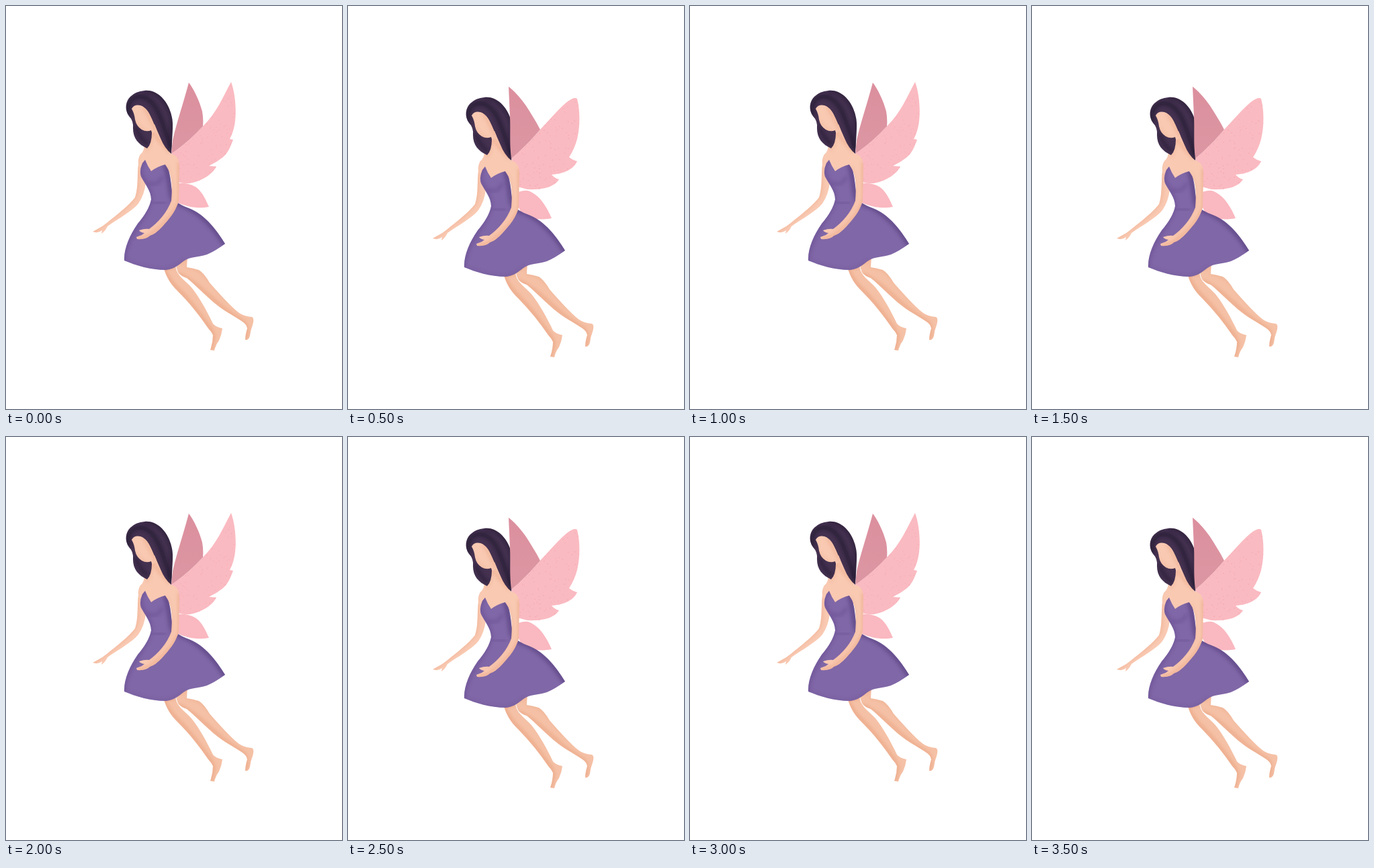
An HTML page for the animation above (4 s loop, 500 by 600 pixels).

```html
<!DOCTYPE html>
<html lang="en">
<head>
<meta charset="utf-8">
<title>Fairy</title>
<style>
html, body { margin: 0; width: 100%; height: 100%; overflow: hidden; background: #fff; }
svg { display: block; width: 500px; height: 600px; }
</style>
</head>
<body>
<svg id="stage" viewBox="0 0 500 600" xmlns="http://www.w3.org/2000/svg">
  <defs>
    <filter id="soft" x="-30%" y="-30%" width="160%" height="160%"><feGaussianBlur stdDeviation="2.6"/></filter>
    <linearGradient id="rearTone" x1="0" y1="0" x2="0" y2="1">
      <stop offset="0" stop-color="#dc8f9e"/><stop offset="1" stop-color="#dc97a3"/>
    </linearGradient>
  </defs>
  <g id="wings"></g>
  <g id="body"></g>
  <path id="rear" fill="url(#rearTone)"/>
</svg>
<script>
const NS = 'http://www.w3.org/2000/svg';
const get = id => document.getElementById(id);
const wings = get('wings'), body = get('body'), rear = get('rear');
const defs = document.querySelector('defs');

function add(parent, tag, attrs) {
  const el = document.createElementNS(NS, tag);
  for (const k in attrs) el.setAttribute(k, attrs[k]);
  parent.appendChild(el);
  return el;
}

// A filled shape with soft strokes clipped to its outline: [path, colour, width, opacity]
function shape(parent, id, d, fill, shades = []) {
  add(add(defs, 'clipPath', { id }), 'path', { d });
  add(parent, 'path', { d, fill });
  const g = add(parent, 'g', { 'clip-path': `url(#${id})` });
  for (const [p, stroke, w, o] of shades) {
    add(g, 'path', { d: p, fill: 'none', stroke, 'stroke-width': w, opacity: o, filter: 'url(#soft)' });
  }
  return g;
}

function random(seed) {
  return () => (seed = (seed * 16807) % 2147483647) / 2147483647;
}

const poses = [
  {
    shift: [0, 0],
    rear: 'M272 114C279 123 288 141 292 157Q294 168 293 179Q271 203 246 220L248 200C252 180 263 148 272 114Z',
    front: 'M335 113C341 130 343 153 341 171Q339 187 333 198L338 199C334 210 330 219 323 225Q313 233 302 238L313 239C307 251 291 261 273 264Q262 265 250 260L246 220Q271 203 293 179C313 160 323 135 335 113Z',
    low: 'M254 264Q264 263 271 265C288 268 295 283 302 299C288 302 270 300 254 292Z',
    speckle: 0.5
  },
  {
    shift: [-3, 10],
    rear: 'M239 120C253 131 265 147 274 163Q281 174 286 184Q266 208 243 227C240 204 242 187 241 165Q240 142 239 120Z',
    front: 'M341 138C346 158 345 181 341 198Q337 213 329 225Q335 230 341 231C336 243 321 250 303 251Q308 257 314 258C307 270 288 274 267 273L249 268L243 227Q266 208 286 184C305 164 323 142 334 138Q338 136 341 138Z',
    low: 'M253 277Q262 274 268 275C285 281 295 298 303 316C287 319 270 318 258 308L253 298Z',
    speckle: 0.75
  }
];

for (const [i, p] of poses.entries()) {
  p.group = add(wings, 'g', {});
  add(p.group, 'path', { d: p.low, fill: '#fab8c0' });
  const g = shape(p.group, 'wing' + i, p.front, '#fabac1');
  const rnd = random(71 + i);
  let dots = '';
  for (let n = 0; n < 190; n++) {
    dots += `M${(248 + rnd() * 96).toFixed(1)} ${(125 + rnd() * 148).toFixed(1)}h${(0.8 + rnd()).toFixed(1)}`;
  }
  add(g, 'path', { d: dots, stroke: '#eea3ae', 'stroke-width': 1.2, opacity: p.speckle });
}

const skin = '#f9c9b2', tan = '#f5c1a6', warm = '#e9a381';

// Legs
shape(body, 'legL',
  'M234 388C239 405 245 414 256 425C273 442 288 461 301 480Q306 485 308 490Q308 501 304 512L310 513Q312 504 317 498Q321 489 322 480Q312 478 308 473C299 454 288 434 276 419C264 406 254 402 252 386Z',
  tan, [['M235 390C240 405 247 413 258 424C276 441 291 463 304 481L309 492L304 513', warm, 5, .75],
        ['M236 392L253 386', warm, 7, .6]]);
shape(body, 'legR',
  'M253 380Q252 390 257 398Q262 403 269 405C282 415 297 432 315 446C328 456 344 464 352 470Q358 474 359 480Q356 490 356 497Q361 498 363 491Q364 482 367 475Q370 465 366 463Q354 462 347 457C334 447 319 430 303 412Q295 398 287 393Q277 390 269 389L270 372Z',
  tan, [['M257 399C284 412 303 434 327 453L354 471Q361 478 356 497', warm, 5, .7],
        ['M268 388Q285 389 299 404L330 438', warm, 3, .5],
        ['M253 383L270 374', warm, 7, .6]]);

// Far arm
shape(body, 'armL',
  'M202 219Q196 225 197 235C195 253 197 270 192 285C184 296 166 310 150 323Q144 328 138 331L129 336Q137 339 143 334L142 339Q148 335 151 328C168 316 187 306 197 294Q206 281 208 263L208 242L218 226Z',
  skin, [['M198 222C194 252 199 270 192 284C180 300 155 317 130 336', warm, 3.5, .55]]);

// Neck, shoulders and chest
shape(body, 'chest',
  'M206 172L206 205Q206 217 199 222L197 238L206 250L242 250L257 234Q257 223 245 220L236 196L222 172Z',
  skin, [['M216 183Q226 200 245 217', warm, 6, .45], ['M217 186Q217 208 209 215', warm, 3, .4]]);

// Dress
shape(body, 'dress',
  'M207 229Q211 239 216 246Q225 239 237 236Q242 241 244 253C247 270 246 283 254 292Q261 297 272 301C297 311 313 333 326 354Q311 365 299 370C284 375 276 372 264 380C256 386 250 392 238 393C215 393 193 386 176 379C175 362 184 341 196 324Q213 304 216 288C216 275 206 264 201 254Q198 245 203 234Z',
  '#8067a7', [['M237 234C247 259 242 286 254 293Q295 304 327 356', '#56407f', 9, .6],
              ['M207 229Q195 242 206 259Q218 277 215 291C211 312 176 345 176 380', '#64498f', 5, .5],
              ['M212 263Q225 270 233 254', '#614a8d', 5, .4],
              ['M218 292L238 294', '#5c4788', 9, .22],
              ['M178 380Q218 394 239 392Q257 388 266 378', '#6d5598', 4, .4]]);

// Near arm
shape(body, 'armR',
  'M237 236Q237 225 246 220Q258 223 258 240L257 290C253 305 244 316 233 328Q222 340 214 342Q209 348 195 347L194 344L202 341L206 338Q200 337 198 334Q207 331 213 332C226 323 240 307 246 290C248 267 246 254 242 244Z',
  skin, [['M258 232L258 288C253 306 235 327 212 343L196 347', warm, 4, .7],
         ['M239 239Q248 258 247 288Q239 309 214 332', warm, 2.5, .4]]);

// Hair and face
shape(body, 'hair',
  'M206 126C223 124 237 138 243 153Q249 167 248 183L246 220Q236 212 230 197Q225 186 221 176L216 182L217 189Q217 205 210 212C197 206 189 197 189 182Q190 171 183 164C176 154 178 142 185 135Q193 127 206 126Z',
  '#443150', [['M183 163Q178 144 192 136Q212 130 226 157Q236 180 245 212', '#1f152c', 6, .6],
              ['M207 126Q235 128 247 166L246 217', '#1f152b', 4, .6],
              ['M193 180Q198 197 211 206', '#1d142a', 5, .45]]);
shape(body, 'face',
  'M187 153Q191 146 200 148C209 151 213 159 217 168L224 184L218 190L216 185Q209 188 202 184Q194 179 192 169Q191 160 187 153Z',
  skin, [['M204 149Q213 164 223 185', warm, 4, .5], ['M192 170Q197 182 212 188', warm, 2.5, .4]]);

let shown = -1;
function draw(ms) {
  const i = Math.floor(ms / 500) % 2;
  if (i === shown) return;
  shown = i;
  const pose = poses[i];
  body.setAttribute('transform', `translate(${pose.shift})`);
  rear.setAttribute('d', pose.rear);
  poses.forEach((p, n) => p.group.setAttribute('display', n === i ? 'inline' : 'none'));
}

const start = performance.now();
function tick() {
  draw((performance.now() - start) % 4000);
  requestAnimationFrame(tick);
}
draw(0);
requestAnimationFrame(tick);
</script>
</body>
</html>
```
